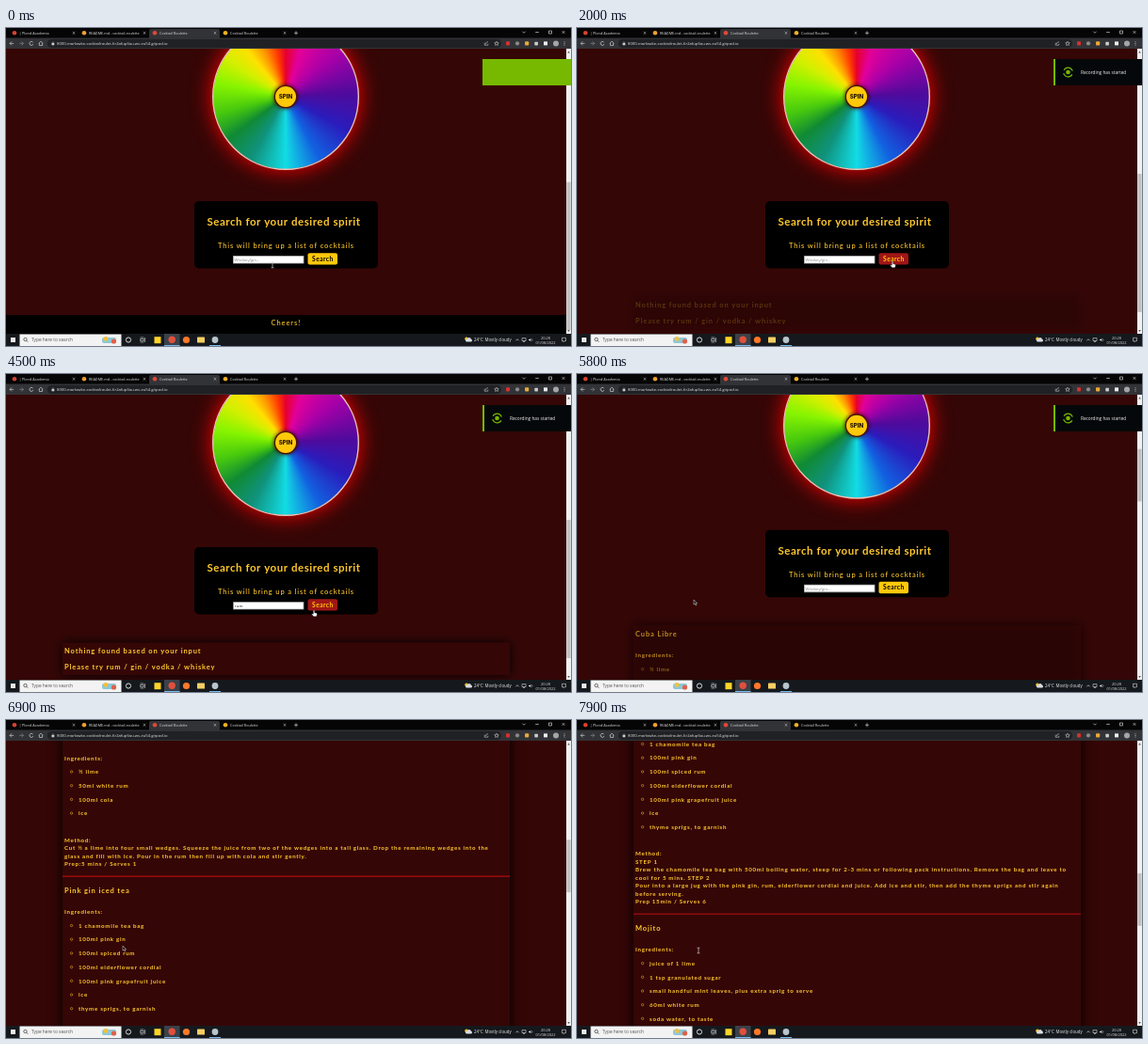
These frames come from a looping animation (600x338 px, 8000 ms). An HTML page with a canvas:

```html
<!DOCTYPE html>
<html lang="en">
<head>
<meta charset="utf-8">
<title>Cocktail Roulette</title>
<style>
  html, body { margin: 0; width: 100%; height: 100%; overflow: hidden; background: #350606; }
  canvas { display: block; }
</style>
</head>
<body>
<canvas id="stage" width="600" height="338"></canvas>
<script>
const ctx = document.getElementById('stage').getContext('2d');
const LOOP = 8000, VIEW_TOP = 22, VIEW_BOTTOM = 325;
const PAGE = '#350606', GOLD = '#ffc82d', YELLOW = '#ffc90a', GREEN = '#76b900';
const FAIL_AT = 1700, FOUND_AT = 4900, FADE = 1300;

const recipes = [
  { name: 'Cuba Libre',
    items: ['½ lime', '50ml white rum', '100ml cola', 'ice'],
    method: ['Cut ½ a lime into four small wedges. Squeeze the juice from two of the wedges into a tall glass. Drop the remaining wedges into the',
      'glass and fill with ice. Pour in the rum then fill up with cola and stir gently.',
      'Prep:5 mins / Serves 1'] },
  { name: 'Pink gin iced tea',
    items: ['1 chamomile tea bag', '100ml pink gin', '100ml spiced rum', '100ml elderflower cordial',
      '100ml pink grapefruit juice', 'ice', 'thyme sprigs, to garnish'],
    method: ['STEP 1',
      'Brew the chamomile tea bag with 500ml boiling water, steep for 2-3 mins or following pack instructions. Remove the bag and leave to',
      'cool for 5 mins. STEP 2',
      'Pour into a large jug with the pink gin, rum, elderflower cordial and juice. Add ice and stir, then add the thyme sprigs and stir again',
      'before serving.',
      'Prep 15min / Serves 6'] },
  { name: 'Mojito',
    items: ['juice of 1 lime', '1 tsp granulated sugar', 'small handful mint leaves, plus extra sprig to serve',
      '60ml white rum', 'soda water, to taste'],
    method: [] }
];

const wheelColours = [[0, '#e6002d'], [.05, '#e2009a'], [.14, '#a800a8'], [.24, '#500a9c'], [.33, '#2a1cbc'],
  [.42, '#1260e0'], [.5, '#12dce4'], [.58, '#10927c'], [.65, '#108a34'], [.71, '#46c80e'], [.78, '#86f400'],
  [.84, '#d2f000'], [.89, '#ffe000'], [.93, '#ff9600'], [.97, '#ff3a00'], [1, '#e6002d']];

const scrollKeys = [[5700, 0], [5800, 18], [6200, 156], [6600, 268], [6900, 277], [7400, 277], [7900, 470]];
const pointerKeys = [[1000, 283, 252], [1600, 335, 248], [2800, 335, 248], [3400, 282, 247], [4200, 282, 247],
  [4500, 327, 251], [5000, 327, 251], [5600, 124, 240], [7500, 124, 240], [7800, 129, 245]];

const clamp = v => Math.max(0, Math.min(1, v));
const mix = (a, b, k) => a + (b - a) * clamp(k);

// Linear value along keys of the form [time, ...values].
function along(keys, t) {
  let i = 0;
  while (i < keys.length - 2 && t > keys[i + 1][0]) i++;
  const [a, b] = [keys[i], keys[i + 1]];
  return a.slice(1).map((v, n) => mix(v, b[n + 1], (t - a[0]) / (b[0] - a[0])));
}

function rect(x, y, w, h, fill, r = 0) {
  ctx.fillStyle = fill;
  ctx.beginPath();
  ctx.roundRect(x, y, w, h, r);
  ctx.fill();
}

function disc(x, y, r, fill) {
  ctx.fillStyle = fill;
  ctx.beginPath();
  ctx.arc(x, y, r, 0, 7);
  ctx.fill();
}

function ring(x, y, r, stroke, width = .7, from = 0, to = Math.PI * 2) {
  ctx.strokeStyle = stroke;
  ctx.lineWidth = width;
  ctx.beginPath();
  ctx.arc(x, y, r, from, to);
  ctx.stroke();
}

function path(d, x, y, stroke, fill, width = .7) {
  const p = new Path2D(d);
  ctx.save();
  ctx.translate(x, y);
  if (fill) { ctx.fillStyle = fill; ctx.fill(p); }
  if (stroke) { ctx.strokeStyle = stroke; ctx.lineWidth = width; ctx.stroke(p); }
  ctx.restore();
}

function text(str, x, y, size, fill, { font = 'Lato', weight = 400, gap = 0, align = 'left' } = {}) {
  ctx.font = `${weight} ${size}px "${font}", sans-serif`;
  ctx.letterSpacing = gap + 'px';
  ctx.textAlign = align;
  ctx.fillStyle = fill;
  ctx.fillText(str, x, y);
}

const ui = (str, x, y, size = 4.6, fill = '#ddd', align = 'left') =>
  text(str, x, y, size, fill, { font: 'Open Sans', align });
const heading = (str, y) => text(str, 62, y, 7.5, GOLD, { weight: 700, gap: .88 });
const body = (str, x, y) => text(str, x, y, 6.2, GOLD, { weight: 700, gap: .7 });

function drawWheel(x, y) {
  ctx.save();
  ctx.shadowColor = '#f00';
  ctx.shadowBlur = 22;
  disc(x, y, 78, '#d01010');
  ctx.restore();
  const g = ctx.createConicGradient(-Math.PI / 2, x, y);
  wheelColours.forEach(([at, c]) => g.addColorStop(at, c));
  disc(x, y, 77, g);
  ring(x, y, 77.3, '#e0c8bc', 1.4);
  ctx.save();
  ctx.shadowColor = '#300';
  ctx.shadowBlur = 5;
  disc(x, y, 12.3, '#4a1000');
  ctx.restore();
  disc(x, y, 11, YELLOW);
  text('SPIN', x, y + 2.3, 6.2, '#201000', { font: 'Inter', weight: 800, align: 'center' });
}

function drawSearch(t, hover) {
  rect(200, 184, 195, 71.5, '#000', 5);
  text('Search for your desired spirit', 213.5, 210, 11.5, GOLD, { weight: 700, gap: .53 });
  text('This will bring up a list of cocktails', 225, 234, 7.5, GOLD, { weight: 500, gap: .86 });
  const focused = t > 3500 && t < FOUND_AT;
  rect(241, 242, 75.5, 8.5, focused ? '#777' : '#999');
  rect(241.8, 242.8, 73.9, 6.9, '#fff');
  const typed = focused ? 'rum'.slice(0, Math.max(0, Math.floor((t - 3500) / 200))) : '';
  if (typed) ui(typed, 243, 248, 4.3, '#222');
  else ui('Whiskey/gin...', 242.5, 248, 4.2, '#888');
  rect(320.5, 239.2, 31.5, 12.4, hover ? '#a01616' : YELLOW, 2);
  text('Search', 336.4, 247.7, 6.6, hover ? YELLOW : '#000', { weight: 700, gap: .5, align: 'center' });
}

function resultPanel(bottom) {
  ctx.save();
  ctx.shadowColor = '#000';
  ctx.shadowBlur = 12;
  rect(60, 285.5, 475, bottom - 285.5, PAGE);
  ctx.restore();
}

function drawRecipes(alpha) {
  resultPanel(1500);
  let y = 297;
  for (const { name, items, method } of recipes) {
    ctx.globalAlpha = alpha;
    heading(name, y);
    body('Ingredients:', 62, y += 22.5);
    ctx.globalAlpha = alpha * alpha;
    y += 14.7;
    items.forEach((item, i) => {
      const row = y + i * 14.7;
      ring(69.6, row - 2.2, 1.2, GOLD, .5);
      body(item, 77, row);
    });
    ctx.globalAlpha = alpha;
    y += (items.length - 1) * 14.7 + 28.5;
    ['Method:', ...method].forEach((line, i) => body(line, 62, y + i * 8.5));
    y += method.length * 8.5 + 11;
    rect(60, y - 1, 475, 1.6, '#8e0a0a');
    y += 17.2;
  }
}

function drawPage(t, scroll, hover) {
  ctx.save();
  ctx.beginPath();
  ctx.rect(0, VIEW_TOP, 600, VIEW_BOTTOM - VIEW_TOP);
  ctx.clip();
  rect(0, VIEW_TOP, 600, 303, PAGE);
  ctx.translate(0, -scroll);
  drawWheel(297, 73);
  drawSearch(t, hover);
  if (t < FAIL_AT) {
    rect(0, 305, 600, 20, '#000');
    text('Cheers!', 281.5, 315.5, 7.5, GOLD, { weight: 500, gap: .93 });
  } else if (t < FOUND_AT) {
    ctx.globalAlpha = clamp((t - FAIL_AT) / FADE);
    resultPanel(320);
    heading('Nothing found based on your input', 297);
    heading('Please try rum / gin / vodka / whiskey', 314);
  } else {
    const alpha = clamp((t - FOUND_AT) / FADE);
    ctx.globalAlpha = alpha;
    drawRecipes(alpha);
  }
  ctx.restore();

  const height = t < FAIL_AT ? 565 : t < FOUND_AT ? 604 : 1590;
  const k = 293 / height;
  rect(595, VIEW_TOP, 5, 303, '#f1f1f1');
  rect(595.4, 28 + (262 + scroll) * k, 4.2, 303 * k, '#c1c1c1');
  path('M-1.3 1L0 -1L1.3 1Z', 597.5, 25.5, null, '#555');
  path('M-1.3 -1L0 1L1.3 -1Z', 597.5, 322, null, '#555');
}

function drawBrowser() {
  const grey = '#ccc', cross = 'M-1.3 -1.3L1.3 1.3M1.3 -1.3L-1.3 1.3';
  rect(0, 0, 600, 11, '#050506');
  rect(152, 1, 75, 11, '#323337', 2);
  rect(0, 10.5, 600, 11.5, '#323337');
  rect(44, 12, 482, 9, '#202124', 4.5);
  const tabs = [[9, '#d8432e', '| Plond Academia', 72], [83, '#f0a030', 'README.md - cocktail-roulette', 147],
    [158, '#e04838', 'Cocktail Roulette', 222], [233, '#f0b020', 'Cocktail Roulette', 296]];
  for (const [x, colour, label, close] of tabs) {
    disc(x, 5.3, 2.3, colour);
    ui(label, x + 5, 7, 3.8, '#e4e4e4');
    path(cross, close, 5.3, grey, null, .6);
  }
  path('M-2 0H2M0 -2V2', 308, 5.3, grey);
  path('M-1.6 -.8L0 .8L1.6 -.8', 550, 4.5, grey);
  path('M-1.8 0H1.8', 564, 4.5, grey);
  path('M-1.5 -1.5H1.5V1.5H-1.5Z', 578, 4.5, grey);
  path(cross, 592, 4.5, grey);
  path('M2.2 0H-2M0 -2L-2 0L0 2', 6, 16.4, grey);
  path('M-2.2 0H2M0 -2L2 0L0 2', 16.5, 16.4, '#888');
  ring(27, 16.4, 2, grey, .8, .4, 5.6);
  path('M-2.3 0L0 -2.2L2.3 0M-1.6 -.4V2.1H1.6V-.4', 37, 16.4, grey);
  rect(48.5, 16, 2.8, 2.3, grey);
  ring(49.9, 15.8, .9, grey, .5, Math.PI);
  ui('8000-marlowke-cocktailroulet-6r2afup6au.ws-eu54.gitpod.io', 54, 18.1, 4.2, '#e4e4e4');
  path('M-1.8 -.5V2H1.8V.5M-.6 1C-.5 -1 .6 -1.3 2 -1.4', 510, 16.2, grey, null, .6);
  path('M0 -2.3L.7 -.7L2.3 -.6L1 .5L1.4 2.1L0 1.2L-1.4 2.1L-1 .5L-2.3 -.6L-.7 -.7Z', 521, 16.4, grey, null, .6);
  rect(531, 14.2, 4, 4.4, '#d83030', 1);
  disc(543, 16.4, 2.1, '#8a8a8a');
  rect(551, 14.2, 4.2, 4.4, '#e8a838', 1);
  rect(561.3, 14.8, 3.6, 3.6, grey, .7);
  rect(571, 14.4, 4, 4, '#eee');
  disc(584, 16.4, 3, '#a5a5a8');
  [-1.6, 0, 1.6].forEach(d => disc(593, 16.4 + d, .5, grey));
}

function drawTaskbar() {
  rect(0, 325, 600, 13, '#15191d');
  rect(5, 329, 5, 5, '#e8e8e8');
  rect(14.5, 325.5, 108, 12.5, '#f3f3f3');
  ring(20.5, 331, 1.7, '#333');
  path('M0 0L1.6 1.6', 21.7, 332.2, '#333');
  ui('Type here to search', 27, 333.4, 4.8, '#555');
  rect(102, 329, 15, 6, '#8cc8d8', 2);
  disc(106, 330.5, 2.4, '#f0c040');
  disc(114.5, 333, 2.6, '#e06048');
  ring(130, 331.5, 2.6, '#eee', .9);
  path('M-2.4 -2.5H1.4M-2.4 2.5H1.4M-2.4 -1H1.4V1H-2.4ZM2.6 -2.5V2.5', 145, 331.5, '#ddd', null, .6);
  rect(157.5, 328.2, 7, 7, '#ffd428');
  rect(168, 325, 16.5, 13, '#3b4148');
  rect(168, 337, 16.5, 1, '#76b9ed');
  disc(176.2, 331.3, 3.7, '#e0503c');
  disc(191.5, 331.5, 3.6, '#ff7828');
  rect(203, 328.6, 8, 6, '#f6cf62', .7);
  disc(222, 331.5, 3.4, '#b8c4cc');
  rect(216, 337, 12, 1, '#76b9ed');
  disc(489, 330.4, 1.8, '#f4c030');
  rect(488, 330.6, 7, 3, '#d8dde4', 1.5);
  disc(491.8, 330.8, 1.9, '#d8dde4');
  ui('24°C', 497, 333.4, 4.4, '#eee');
  ui('Mostly cloudy', 508.5, 333.4, 4.4, '#eee');
  path('M-1.6 .8L0 -.8L1.6 .8', 543, 331.5, '#ddd');
  path('M-2 -1.7H2V1.2H-2ZM-1 2.2H1', 550, 331.3, '#ddd', null, .6);
  path('M-2 -.6H-1L.3 -1.8V1.8L-1 .6H-2Z', 557, 331.5, null, '#ddd');
  ring(557.3, 331.5, 1.6, '#ddd', .5, -.8, .8);
  ui('20:28', 573, 330.6, 4, '#ddd', 'center');
  ui('01/08/2022', 573, 336.4, 4, '#ddd', 'center');
  path('M-2 -2H2V1.4H.6L-.4 2.4V1.4H-2Z', 592.5, 331.3, '#ddd', null, .6);
}

function drawToast(t) {
  const x = mix(506, 600, (t - 6000) / 204);
  if (x >= 600) return;
  rect(x, 33, 600 - x, 28, GREEN);
  const slide = t < 3000 ? mix(92, 0, (t - 100) / 300) : mix(0, 92, (t - 5850) / 200);
  rect(508 + slide, 33, 92, 28, '#05080a');
  ring(521.5 + slide, 47, 4.9, GREEN, 1.3, .5, 2.9);
  ring(521.5 + slide, 47, 4.9, GREEN, 1.3, 3.6, 6);
  disc(521.5 + slide, 47, 2.3, GREEN);
  ui('Recording has started', 535 + slide, 49, 4.75, '#f2f2f2');
}

function drawPointer(t, x, y, hover) {
  if (hover) {
    path('M-.7 .3Q0 -.6 .7 .3V2.6L2.9 3.2Q3.6 3.5 3.4 4.3L2.8 6.8H-.4L-2.5 4.2Q-2.2 3.3 -.7 4.2Z', x, y, '#000', '#fff', .4);
  } else if (t < 4500 || t > 7600) {
    path('M-1.4 -2.8H1.4M0 -2.8V2.8M-1.4 2.8H1.4', x, y, t > 3300 && t < 4500 ? '#222' : '#ccc', null, .7);
  } else {
    path('M0 0V5L1.2 4L2 5.9L2.9 5.5L2.1 3.7H3.6Z', x, y, '#ddd', '#111', .5);
  }
}

function draw(now) {
  const t = now % LOOP;
  const [scroll] = along(scrollKeys, t);
  const [x, y] = along(pointerKeys, t);
  const hover = x > 320 && x < 352 && y > 239 && y < 252;
  drawPage(t, scroll, hover);
  drawBrowser();
  drawTaskbar();
  drawToast(t);
  drawPointer(t, x, y, hover);
}

const start = performance.now();
function tick() {
  draw(performance.now() - start);
  requestAnimationFrame(tick);
}
tick();
</script>
</body>
</html>
```
